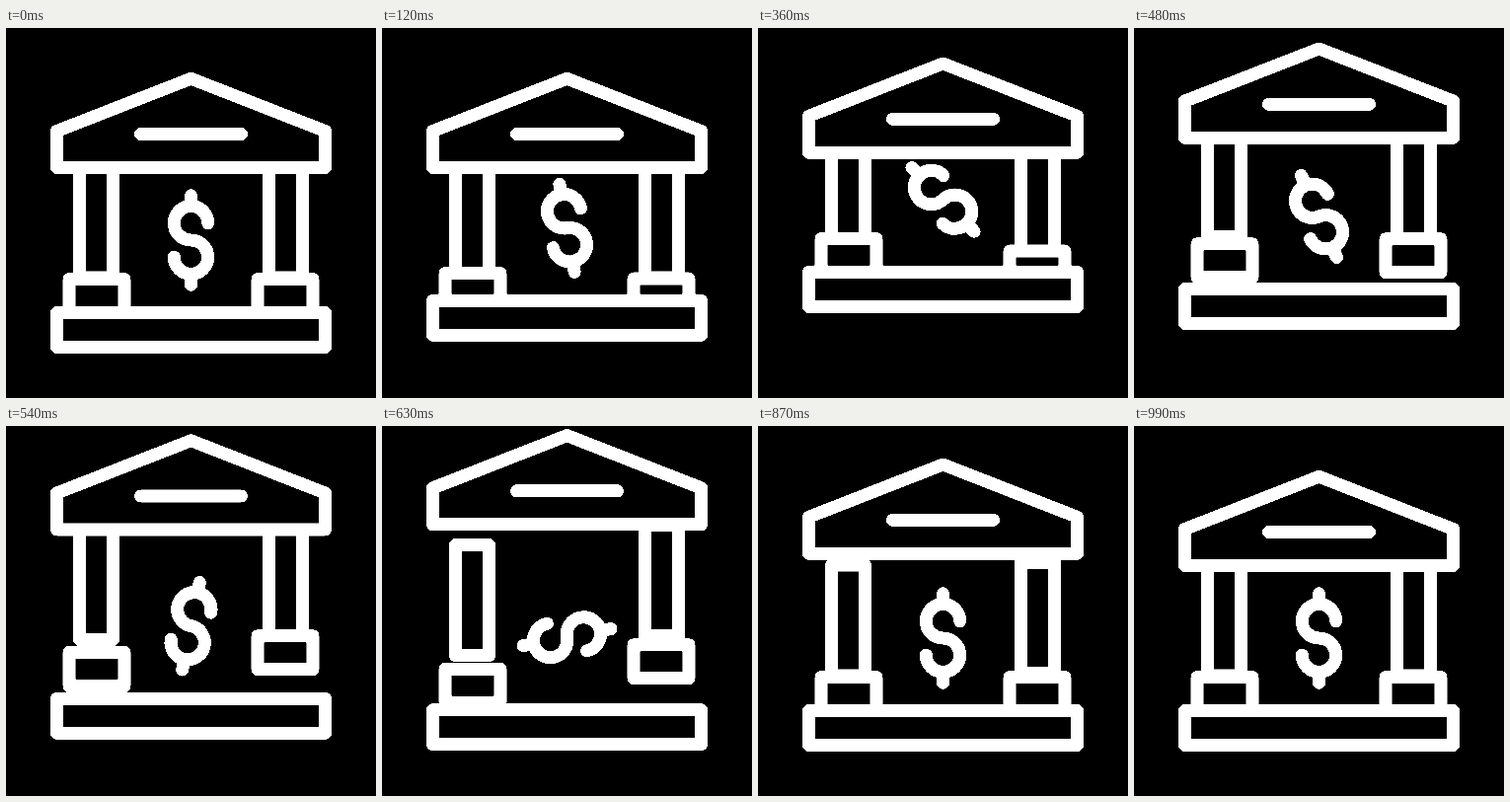
Write an HTML page with a canvas that moves like this. It is 375 by 375 pixels and loops after 1500 ms.

```html
<!DOCTYPE html>
<html lang="en">
<head>
<meta charset="utf-8">
<title>Bank</title>
<style>
  html, body { margin: 0; width: 100%; height: 100%; overflow: hidden; background: #000; }
  /* High contrast gives the line art hard edges */
  canvas { display: block; width: 100vw; height: 100vh; filter: contrast(20); }
</style>
</head>
<body>
<canvas id="stage" width="375" height="375"></canvas>
<script>
const ctx = document.getElementById('stage').getContext('2d');
const LOOP = 1500, TICK = 30, LAST = 33;
const MID = 187.5, LIFT = 42;

// Progress from a to b with a sine ease in and out
function ease(t, a, b) {
  const p = Math.min(1, Math.max(0, (t - a) / (b - a)));
  return (1 - Math.cos(Math.PI * p)) / 2;
}

// Each part starts one tick after the one before and peaks a little later
function rise(t, order) {
  const peak = 11 + 2.2 * order;
  return -LIFT * (ease(t, order, peak) - ease(t, peak, peak + 11));
}

function block(x, y, w, h, dy) {
  ctx.beginPath();
  ctx.rect(x, y + dy, w, h);
  ctx.fill();
  ctx.stroke();
}

function roof(dy) {
  ctx.save();
  ctx.translate(MID, dy);
  ctx.beginPath();
  ctx.moveTo(0, 51.3);
  ctx.lineTo(136, 104.5);
  ctx.lineTo(136, 141.5);
  ctx.lineTo(-136, 141.5);
  ctx.lineTo(-136, 104.5);
  ctx.closePath();
  ctx.fill();
  ctx.stroke();
  ctx.beginPath();
  ctx.moveTo(-51, 107.5);
  ctx.lineTo(51, 107.5);
  ctx.stroke();
  ctx.restore();
}

function dollar(t) {
  const r = 17.2, end = 45.2;
  const angle = -45 * ease(t, 0, 13) + 225 * ease(t, 13, 28);
  ctx.save();
  ctx.translate(MID, 215 + rise(t, 0));
  ctx.rotate(angle * Math.PI / 180);
  ctx.beginPath();
  ctx.arc(0, -r, r, 0, Math.PI / 2, true);
  ctx.arc(0, r, r, -Math.PI / 2, Math.PI);
  ctx.moveTo(0, -end);
  ctx.lineTo(0, -2 * r);
  ctx.moveTo(0, 2 * r);
  ctx.lineTo(0, end);
  ctx.stroke();
  ctx.restore();
}

function draw(t) {
  ctx.fillStyle = '#000';
  ctx.fillRect(0, 0, 375, 375);
  ctx.strokeStyle = '#fff';
  ctx.lineWidth = 13;
  ctx.lineCap = ctx.lineJoin = 'round';

  dollar(t);
  block(74.5, 141, 34, 112, rise(t, 2));
  block(266.5, 141, 34, 112, rise(t, 4));
  block(64, 254.5, 56, 34, rise(t, 1));
  block(255, 254.5, 56, 34, rise(t, 3));
  block(51.5, 288.5, 272, 35, rise(t, 0));
  roof(rise(t, 5));
}

const start = performance.now();
function loop() {
  const ms = (performance.now() - start) % LOOP;
  draw(Math.min(LAST, Math.floor(ms / TICK)));
  requestAnimationFrame(loop);
}
loop();
</script>
</body>
</html>
```
